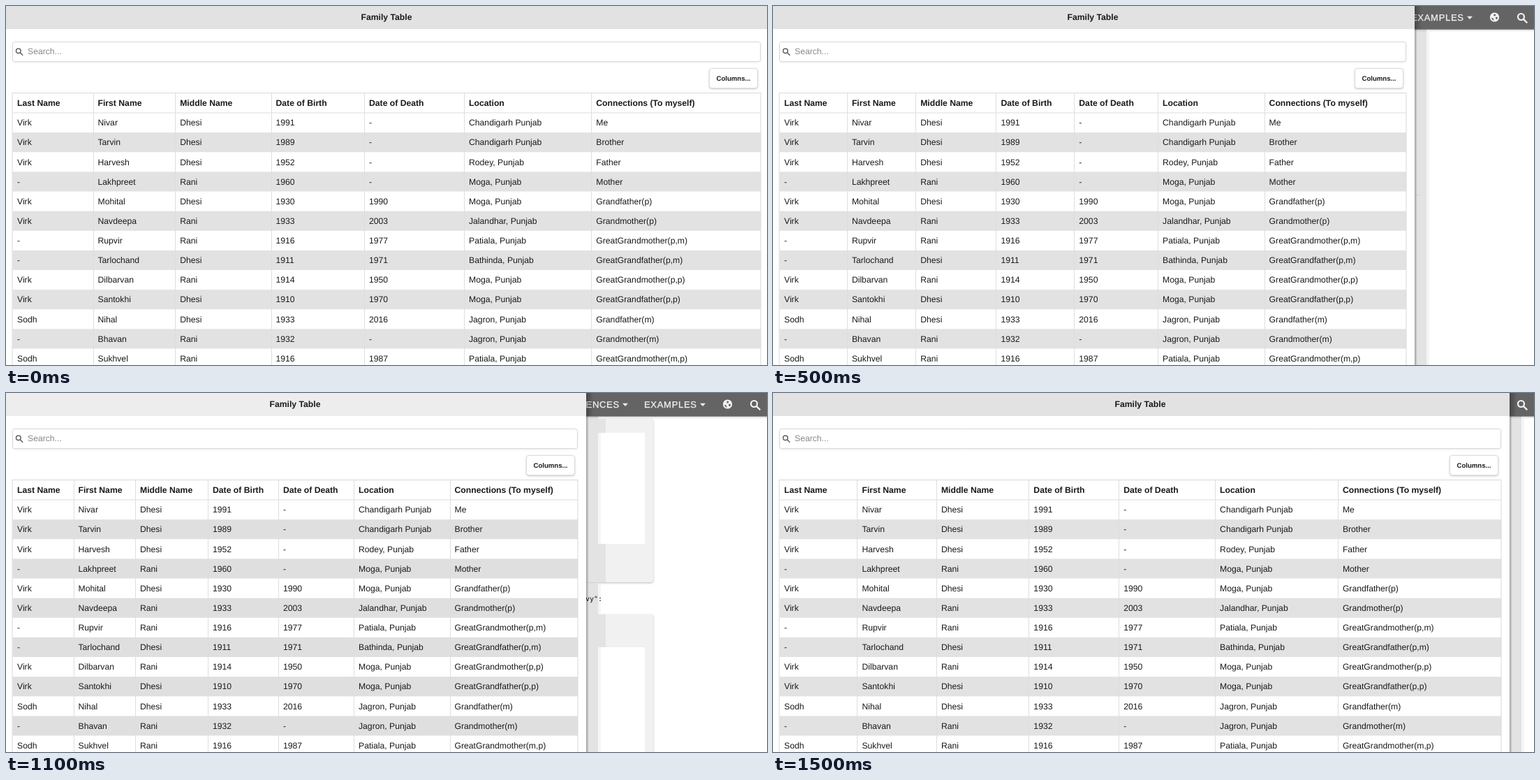
Recreate the animation shown at these times as an HTML page with a canvas. Size 1090 by 514 pixels, loop 1.6 s.

```html
<!DOCTYPE html>
<html lang="en">
<head>
<meta charset="utf-8">
<title>Family Table</title>
<style>
html, body { margin: 0; width: 100%; height: 100%; overflow: hidden; background: #fff; }
canvas { display: block; width: 1090px; height: 514px; }
</style>
</head>
<body>
<canvas id="stage"></canvas>
<script>
const W = 1090, H = 514, LOOP = 1600, STEP = 100;
const SANS = '"Liberation Sans", Arial, sans-serif';
const MONO = '"DejaVu Sans Mono", monospace';
const canvas = document.getElementById('stage');
const ctx = canvas.getContext('2d');
const dpr = window.devicePixelRatio || 1;
canvas.width = Math.round(W * dpr);
canvas.height = Math.round(H * dpr);

// Right edge of the dragged panel, one position per step
const edges = [1093, 1060, 1018, 978, 948, 919, 884, 849,
               829, 819, 820, 831, 866, 915, 984, 1055];

// Text column positions at the narrow and the wide panel
const NARROW = 831, WIDE = 1093;
const colNarrow = [16, 103.5, 192, 296, 397, 505, 642.5];
const colWide = [16, 131.5, 249.2, 386.5, 520, 663, 845.3];

const heads = ['Last Name', 'First Name', 'Middle Name', 'Date of Birth',
               'Date of Death', 'Location', 'Connections (To myself)'];
const rows = `Virk|Nivar|Dhesi|1991|-|Chandigarh Punjab|Me
Virk|Tarvin|Dhesi|1989|-|Chandigarh Punjab|Brother
Virk|Harvesh|Dhesi|1952|-|Rodey, Punjab|Father
-|Lakhpreet|Rani|1960|-|Moga, Punjab|Mother
Virk|Mohital|Dhesi|1930|1990|Moga, Punjab|Grandfather(p)
Virk|Navdeepa|Rani|1933|2003|Jalandhar, Punjab|Grandmother(p)
-|Rupvir|Rani|1916|1977|Patiala, Punjab|GreatGrandmother(p,m)
-|Tarlochand|Dhesi|1911|1971|Bathinda, Punjab|GreatGrandfather(p,m)
Virk|Dilbarvan|Rani|1914|1950|Moga, Punjab|GreatGrandmother(p,p)
Virk|Santokhi|Dhesi|1910|1970|Moga, Punjab|GreatGrandfather(p,p)
Sodh|Nihal|Dhesi|1933|2016|Jagron, Punjab|Grandfather(m)
-|Bhavan|Rani|1932|-|Jagron, Punjab|Grandmother(m)
Sodh|Sukhvel|Rani|1916|1987|Patiala, Punjab|GreatGrandmother(m,p)`
  .split('\n').map(line => line.split('|'));

function rect(x, y, w, h, color) {
  ctx.fillStyle = color;
  ctx.fillRect(x, y, w, h);
}

function text(str, x, y, { size = 12.2, weight = '', color = '#1a1a1a', align = 'left', family = SANS, spacing = 0, heft = 0 } = {}) {
  ctx.font = `${weight} ${size}px ${family}`;
  ctx.textRendering = 'geometricPrecision';
  ctx.letterSpacing = spacing + 'px';
  ctx.textAlign = align;
  ctx.fillStyle = color;
  ctx.fillText(str, x, y);
  if (heft) {
    ctx.strokeStyle = color;
    ctx.lineWidth = heft;
    ctx.strokeText(str, x, y);
  }
}

function box(x, y, w, h, r, fill, stroke, shadow) {
  ctx.save();
  ctx.beginPath();
  ctx.roundRect(x, y, w, h, r);
  if (shadow) {
    ctx.shadowColor = shadow;
    ctx.shadowBlur = 3 * dpr;
    ctx.shadowOffsetY = dpr;
  }
  ctx.fillStyle = fill;
  ctx.fill();
  ctx.shadowColor = 'transparent';
  if (stroke) {
    ctx.lineWidth = 1;
    ctx.strokeStyle = stroke;
    ctx.stroke();
  }
  ctx.restore();
}

// Gradient of black from the given strength to none, along x or y
function fade(x, y, w, h, strength, down) {
  const g = ctx.createLinearGradient(x, y, down ? x : x + w, down ? y + h : y);
  g.addColorStop(0, `rgba(0,0,0,${strength})`);
  g.addColorStop(1, 'rgba(0,0,0,0)');
  rect(x, y, w, h, g);
}

function lens(x, y, r, width, color) {
  const d = r * 0.7;
  ctx.strokeStyle = color;
  ctx.lineWidth = width;
  ctx.beginPath();
  ctx.arc(x, y, r, 0, 7);
  ctx.moveTo(x + d, y + d);
  ctx.lineTo(x + r * 1.95, y + r * 1.95);
  ctx.stroke();
}

function poly(points, color) {
  ctx.fillStyle = color;
  ctx.beginPath();
  points.forEach(([x, y]) => ctx.lineTo(x, y));
  ctx.fill();
}

function caret(x, y) {
  poly([[x, y], [x + 8, y], [x + 4, y + 4.3]], '#f0f0f0');
}

function globe(x, y) {
  const sea = '#646464';
  ctx.fillStyle = '#f4f4f4';
  ctx.beginPath();
  ctx.arc(x, y, 6.6, 0, 7);
  ctx.fill();
  poly([[x - 0.5, y - 4.8], [x + 2.2, y - 3.6], [x + 0.6, y - 1.6], [x - 1.6, y - 2]], sea);
  poly([[x - 4.8, y + 0.4], [x - 2, y + 1.4], [x - 0.6, y + 4.4], [x - 2.6, y + 4.2]], sea);
  poly([[x + 1.8, y - 0.6], [x + 4.8, y + 0.2], [x + 3.2, y + 3.6], [x + 1.4, y + 1.8]], sea);
}

function card(edge, y, h, innerY, innerH) {
  box(700, y, 227, h, 4, '#f1f1f1', null, 'rgba(0,0,0,.28)');
  const band = Math.min(edge + 28, 927) - edge;
  if (band > 0) rect(edge, y, band, h, 'rgba(0,0,0,.06)');
  rect(712, innerY, 203, innerH, '#fff');
}

function page(edge) {
  rect(0, 0, W, H, '#fff');
  card(edge, 37, 234, 57, 159);
  card(edge, 317, 240, 364, 180);

  // Soft strip travelling beside the panel, merged with what lies below it
  ctx.globalCompositeOperation = 'darken';
  rect(edge, 33, 17, H, '#e3e3e3');
  rect(edge + 17, 37, 4, H, '#f5f5f5');
  ctx.globalCompositeOperation = 'source-over';
  text('"navy":', 854, 297.5, { size: 10, color: '#111', align: 'right', family: MONO });

  rect(0, 0, W, 33.5, '#646464');
  fade(0, 33, W, 4, 0.18, true);

  const menu = { size: 13, color: '#f0f0f0', spacing: 0.7, heft: 0.3 };
  text('REFERENCES', 783, 21.3, menu);
  caret(883, 14.7);
  text('EXAMPLES', 914, 21.3, menu);
  caret(994, 14.7);
  globe(1033.5, 16);
  lens(1071.5, 15.5, 4.5, 2.2, '#f4f4f4');

  fade(edge, 0, 10, 33, 0.3);
  fade(edge, 33, 4, H, 0.3);
}

function table(edge, shade) {
  const left = 9.5, right = edge - 12, top = 125, rowH = 28.13, first = 153;
  const k = (edge - NARROW) / (WIDE - NARROW);
  const cols = colNarrow.map((x, i) => x + (colWide[i] - x) * k);

  rows.forEach((row, i) => {
    if (i % 2) rect(left, first + i * rowH, right - left, rowH, shade);
  });
  const line = '#dedede';
  rect(left, first - 0.5, right - left, 1, line);
  cols.slice(1).forEach(x => rect(Math.round(x - 7), top, 1, H, line));
  ctx.strokeStyle = '#d9d9d9';
  ctx.lineWidth = 1;
  ctx.strokeRect(left - 0.5, top - 0.5, right - left + 0.5, H);

  cols.forEach((x, c) => {
    text(heads[c], x, 143.2, { weight: 'bold' });
    rows.forEach((row, i) => text(row[c], x, 171.3 + i * rowH));
  });
}

function panel(edge, pale) {
  rect(0, 0, edge, H, '#fff');
  rect(0, 0, edge, 33, pale ? '#ededed' : '#e2e2e2');
  text('Family Table', (edge - 3) / 2, 19.8, { weight: 'bold', align: 'center' });

  box(9.5, 51.5, edge - 22, 28, 3, '#fff', '#d8d8d8', 'rgba(0,0,0,.1)');
  lens(17.8, 64.3, 3.3, 1.6, '#666');
  text('Search...', 31, 69.4, { color: '#888' });

  box(edge - 85.5, 89.5, 69, 28, 3.5, '#fff', '#dcdcdc', 'rgba(0,0,0,.28)');
  text('Columns...', edge - 51, 106.5, { size: 9.6, weight: 'bold', align: 'center' });

  table(edge, pale ? '#dfdfdf' : '#e2e2e2');
}

function draw() {
  const step = Math.floor(performance.now() % LOOP / STEP);
  const edge = edges[step];
  ctx.setTransform(dpr, 0, 0, dpr, 0, 0);
  page(edge);
  panel(edge, step >= 8 && step <= 12);
  requestAnimationFrame(draw);
}
draw();
</script>
</body>
</html>
```
